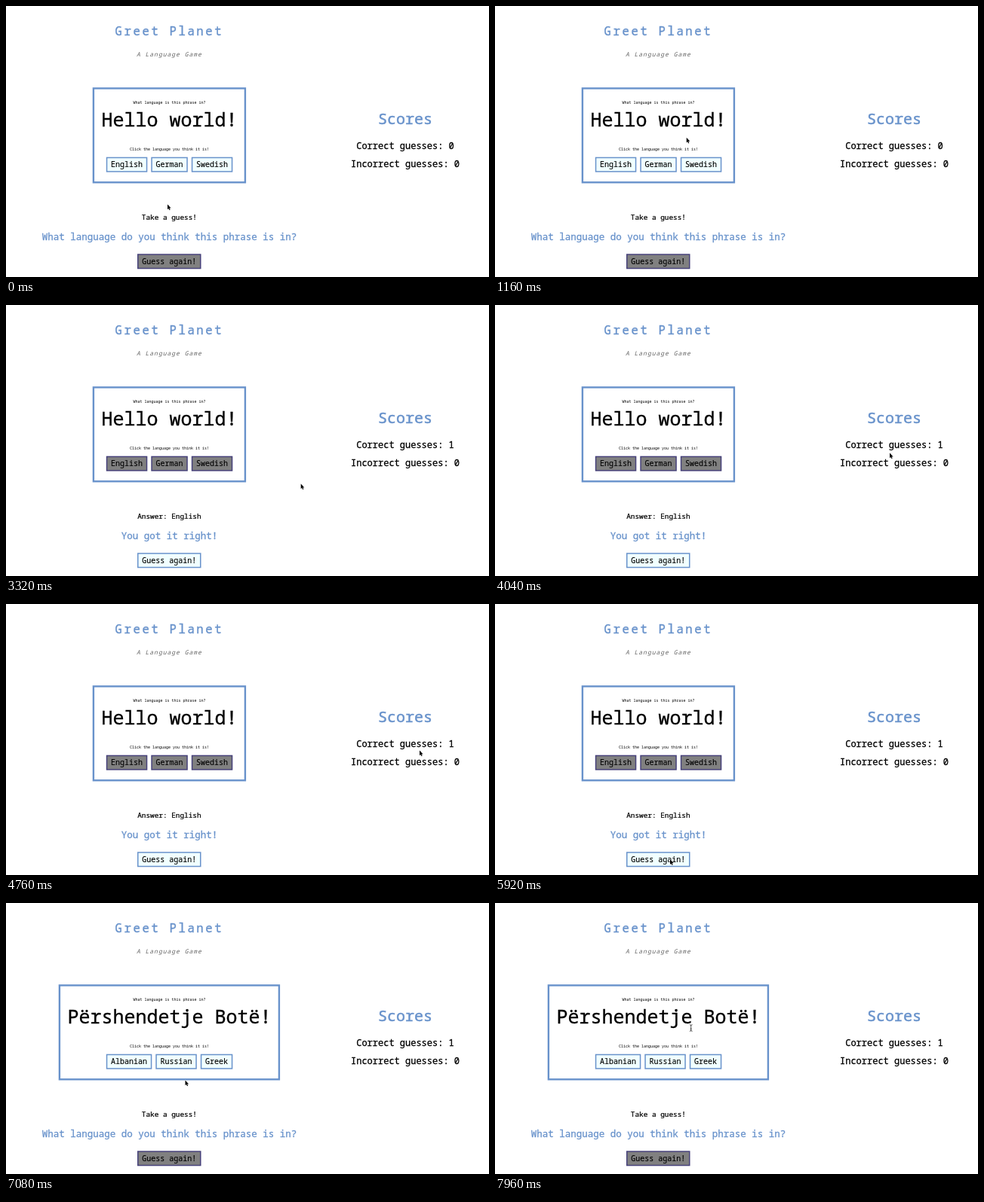
An HTML page that plays this animation: 640x360 px, repeating every 8 s.

```html
<!DOCTYPE html>
<html lang="en">
<head>
<meta charset="utf-8">
<title>A Language Game</title>
<style>
  html, body { margin: 0; width: 100%; height: 100%; overflow: hidden; background: #fff; }
  svg { display: block; width: 100%; height: 100%; color: #000; }
  text { font-family: "Noto Sans Mono", "DejaVu Sans Mono", monospace; text-anchor: middle; white-space: pre; fill: currentColor; }
  .medium { stroke: currentColor; stroke-width: 0.025em; }
  .light { stroke: currentColor; stroke-width: 0.013em; }
  .blue { color: #6892cb; }
  .card { fill: none; stroke: #6892cb; stroke-width: 2.4; }
  .button rect { fill: #f0ffff; stroke: #6892cb; stroke-width: 1.5; }
  .button.off rect { fill: #808080; stroke: #46417a; }
</style>
</head>
<body>
<svg id="stage" viewBox="0 0 640 360" xmlns="http://www.w3.org/2000/svg"></svg>
<script>
const LOOP = 8000, STEP = 40;
const ANSWERED = 1880, NEXT_ROUND = 6000;
const MID = 216.4, SCORE_MID = 529;
const stage = document.getElementById("stage");

function add(tag, attrs, parent = stage) {
  const el = document.createElementNS("http://www.w3.org/2000/svg", tag);
  for (const key in attrs) el.setAttribute(key, attrs[key]);
  parent.append(el);
  return el;
}

function label(str, x, y, size, attrs = {}, parent = stage) {
  const el = add("text", { x, y, "font-size": size, ...attrs }, parent);
  el.textContent = str;
  return el;
}

function button(str, x, y) {
  const g = add("g", { class: "button" });
  const width = str.length * 6 + 12.5;
  add("rect", { x: x + 0.75, y: y + 0.75, width: width - 1.5, height: 18.5 }, g);
  label(str, x + width / 2, y + 13.2, 10, { class: "light" }, g);
  return { g, width };
}

function buttonRow(names) {
  let x = 132.8;
  return names.map(name => {
    const { g, width } = button(name, x, 200.7);
    x += width + 5;
    return g;
  });
}

label("Greet Planet", MID, 39, 15.6, { class: "blue medium", "letter-spacing": 2.64 });
label("A Language Game", MID, 66.6, 8, { fill: "#666", style: "color: #666", "font-style": "italic", "letter-spacing": 1 });

const card = add("rect", { class: "card", y: 109.4, height: 124.9 });
label("What language is this phrase in?", MID, 130.2, 5);
const phrase = label("", MID, 160.2, 25, { class: "light" });
label("Click the language you think it is!", MID, 191.8, 5);
const rounds = [
  { text: "Hello world!", buttons: buttonRow(["English", "German", "Swedish"]) },
  { text: "Përshendetje Botë!", buttons: buttonRow(["Albanian", "Russian", "Greek"]) }
];

const message = label("", MID, 284.4, 9.38, { class: "medium" });
const prompt = label("", MID, 311.2, 12.5, { class: "blue medium" });
const again = button("Guess again!", 174, 329.3).g;

label("Scores", SCORE_MID, 157, 20, { class: "blue medium" });
const correct = label("", SCORE_MID, 190, 12, { class: "medium" });
label("Incorrect guesses: 0", SCORE_MID, 214, 12, { class: "medium" });

const arrow = add("path", {
  d: "M0 0V6.8L1.5 5.4L2.5 7.8L3.6 7.3L2.6 5H4.6Z",
  fill: "#000", stroke: "#fff", "stroke-width": 0.7, "paint-order": "stroke"
});
const beam = add("path", {
  d: "M-1.8 -4.3Q0 -4.3 0 -3.2Q0 -4.3 1.8 -4.3M0 -3.5V3.5M-1.8 4.3Q0 4.3 0 3.2Q0 4.3 1.8 4.3M-1 1.2H1",
  fill: "none", stroke: "#222", "stroke-width": 0.8
});

// The pointer rests between moves; a bow bends a move sideways.
const home = { x: 214, y: 263.5 };
const moves = [
  { from: 40, to: 840, x: 282, y: 163, bowX: -100 },
  { from: 960, to: 1560, x: 173, y: 208.5 },
  { from: 2800, to: 3560, x: 458, y: 197, bowY: 45 },
  { from: 3640, to: 4480, x: 598, y: 196 },
  { from: 4480, to: 4760, x: 548, y: 194.5 },
  { from: 4760, to: 5280, x: 518, y: 157 },
  { from: 5320, to: 5720, x: 232, y: 339.3 },
  { from: 6480, to: 7080, x: 237.5, y: 235.5 },
  { from: 7360, to: 7960, x: 259.7, y: 166, bowX: -90 }
];

function pointerAt(t) {
  let { x, y } = home;
  for (const { from, to, x: endX, y: endY, bowX = 0, bowY = 0 } of moves) {
    if (t <= from) break;
    const u = Math.min(1, (t - from) / (to - from));
    const ease = u * u * (3 - 2 * u), bend = Math.sin(Math.PI * u);
    x += (endX - x) * ease + bowX * bend;
    y += (endY - y) * ease + bowY * bend;
  }
  return { x, y };
}

function render(t) {
  const second = t >= NEXT_ROUND;
  const answered = t >= ANSWERED && !second;
  const current = rounds[+second];
  const width = current.text.length * 15 + 21;

  phrase.textContent = current.text;
  card.setAttribute("x", MID - width / 2);
  card.setAttribute("width", width);
  for (const round of rounds) {
    for (const b of round.buttons) {
      b.style.display = round === current ? "" : "none";
      b.classList.toggle("off", answered);
    }
  }
  again.classList.toggle("off", !answered);
  message.textContent = answered ? "Answer: English" : "Take a guess!";
  prompt.textContent = answered ? "You got it right!" : "What language do you think this phrase is in?";
  correct.textContent = "Correct guesses: " + (t >= ANSWERED ? 1 : 0);

  const { x, y } = pointerAt(t);
  const overText = y > 138 && y < 172 && Math.abs(x - MID) < width / 2 - 10;
  arrow.style.display = overText ? "none" : "";
  beam.style.display = overText ? "" : "none";
  (overText ? beam : arrow).setAttribute("transform", `translate(${x} ${y})`);
}

const start = performance.now();
function tick() {
  const t = (performance.now() - start) % LOOP;
  render(Math.floor(t / STEP) * STEP);
  requestAnimationFrame(tick);
}
tick();
</script>
</body>
</html>
```
